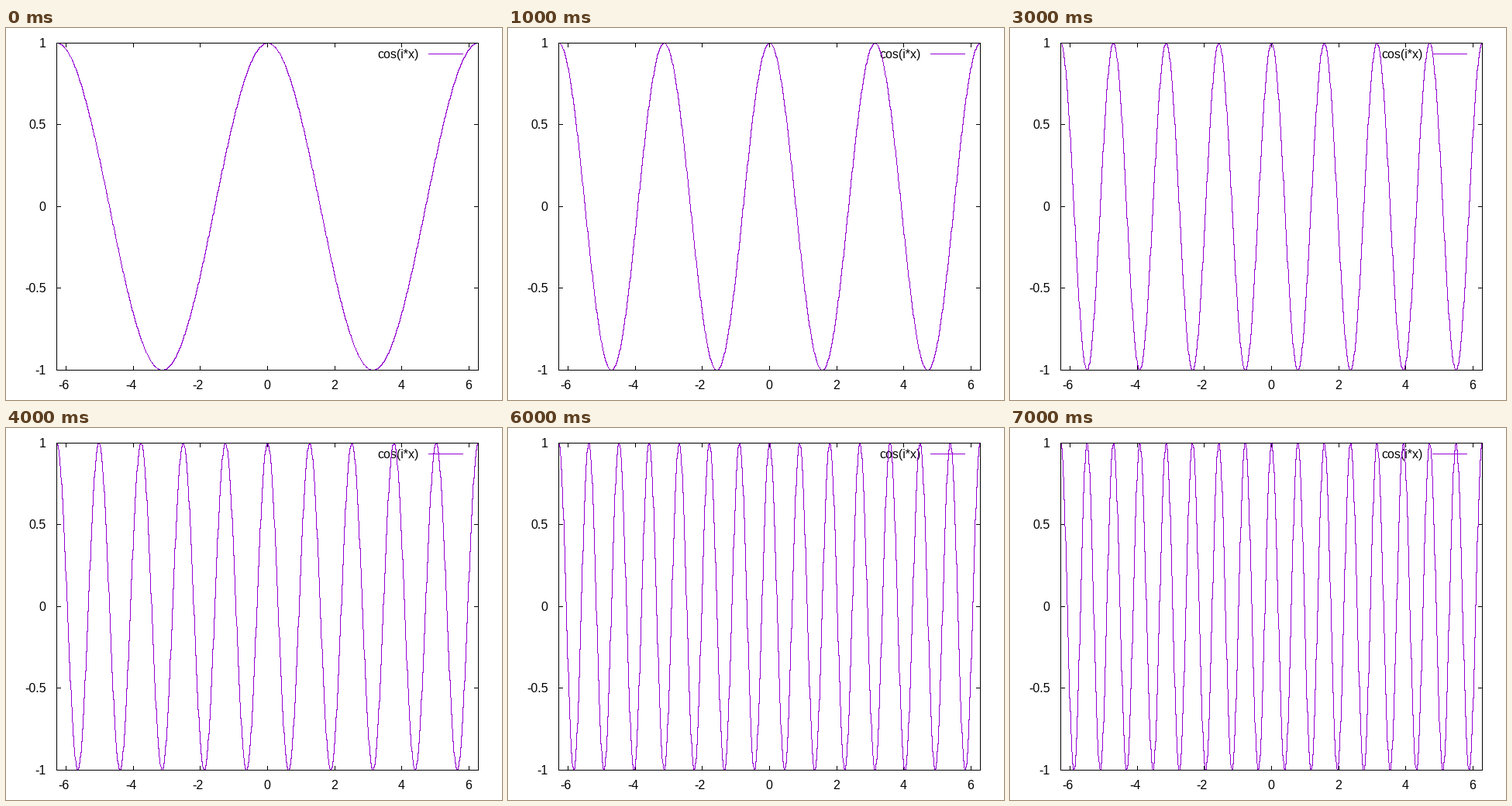
Recreate the animation shown at these times as a matplotlib script. Size 640 by 480 pixels, loop 8000 ms.

```python
import numpy as np
import matplotlib.pyplot as plt
from matplotlib.animation import FuncAnimation
from matplotlib.patches import Rectangle

W, H, DPI = 640, 480, 80
LEFT, RIGHT, TOP, BOTTOM = 65, 609, 19, 441
MID_X, MID_Y = (LEFT + RIGHT) / 2, (TOP + BOTTOM) / 2
UNIT_X, UNIT_Y = (RIGHT - LEFT) / (4 * np.pi), (BOTTOM - TOP) / 2
TIC = 5
FONT_PX = 16
PURPLE = "#9400d3"
PURPLE_RGBA = (0x94, 0x00, 0xD3, 255)
SAMPLES, SUBSTEPS = 1000, 64
FRAMES, INTERVAL = 8, 1000

plt.rcParams["font.family"] = "Liberation Sans"
plt.rcParams["text.hinting"] = "native"

fig = plt.figure(figsize=(W / DPI, H / DPI), dpi=DPI, facecolor="white")
ax = fig.add_axes([0, 0, 1, 1])
ax.axis("off")


def bar(x0, y0, x1, y1, color="black", z=1):
    """Fill whole pixels from (x0, y0) to (x1, y1), both included."""
    ax.add_patch(Rectangle((x0, y0), x1 - x0 + 1, y1 - y0 + 1, lw=0,
                           facecolor=color, antialiased=False, zorder=z))


def label(x, row, text):
    """Write text from x, vertically centred on a pixel row."""
    ax.text(x, row + 6, text, fontsize=FONT_PX * 72 / DPI, color="black",
            ha="left", va="baseline", zorder=1)


def advance(text):
    narrow = {"-": 0.333, ".": 0.278, " ": 0.278}
    return FONT_PX * sum(narrow.get(c, 0.556) for c in text)


def to_pixel(v):
    return np.floor(v + 0.5).astype(int)


def curve_pixels(i):
    """One-pixel-wide trace of cos(i*x), without smoothing."""
    x = np.linspace(-2 * np.pi, 2 * np.pi, SAMPLES)
    cols = to_pixel(MID_X + UNIT_X * x)
    rows = to_pixel(MID_Y - UNIT_Y * np.cos(i * x))
    k = np.arange(SAMPLES)
    t = np.linspace(0, SAMPLES - 1, (SAMPLES - 1) * SUBSTEPS + 1)
    img = np.zeros((H, W, 4), np.uint8)
    img[to_pixel(np.interp(t, k, rows)), to_pixel(np.interp(t, k, cols))] = PURPLE_RGBA
    return img


# Tics and their labels
for v in range(-6, 7, 2):
    x = int(to_pixel(MID_X + UNIT_X * v))
    bar(x, TOP, x, TOP + TIC)
    bar(x, BOTTOM - TIC, x, BOTTOM)
    text = str(v)
    padded = text + " " if v < 0 else text
    label(x - advance(padded) / 2, 460, text)

for v in (-1, -0.5, 0, 0.5, 1):
    y = int(MID_Y - UNIT_Y * v)
    bar(LEFT, y, LEFT + TIC, y)
    bar(RIGHT - TIC, y, RIGHT, y)
    text = f"{v:g}"
    label(51.5 - advance(text), y, text)

# Key
label(479, 33, "cos(i*x)")
bar(545, 33, 589, 33, PURPLE, 2)

# Border lies over the curve
for y in (TOP, BOTTOM):
    bar(LEFT, y, RIGHT, y, z=4)
for x in (LEFT, RIGHT):
    bar(x, TOP, x, BOTTOM, z=4)

curve = ax.imshow(curve_pixels(1), extent=(0, W, H, 0), aspect="auto",
                  interpolation="nearest", zorder=3)
ax.set_xlim(0, W)
ax.set_ylim(H, 0)


def draw(frame):
    curve.set_data(curve_pixels(frame + 1))
    return (curve,)


anim = FuncAnimation(fig, draw, frames=FRAMES, interval=INTERVAL,
                     repeat=True, repeat_delay=0, blit=False)
plt.show()
```
